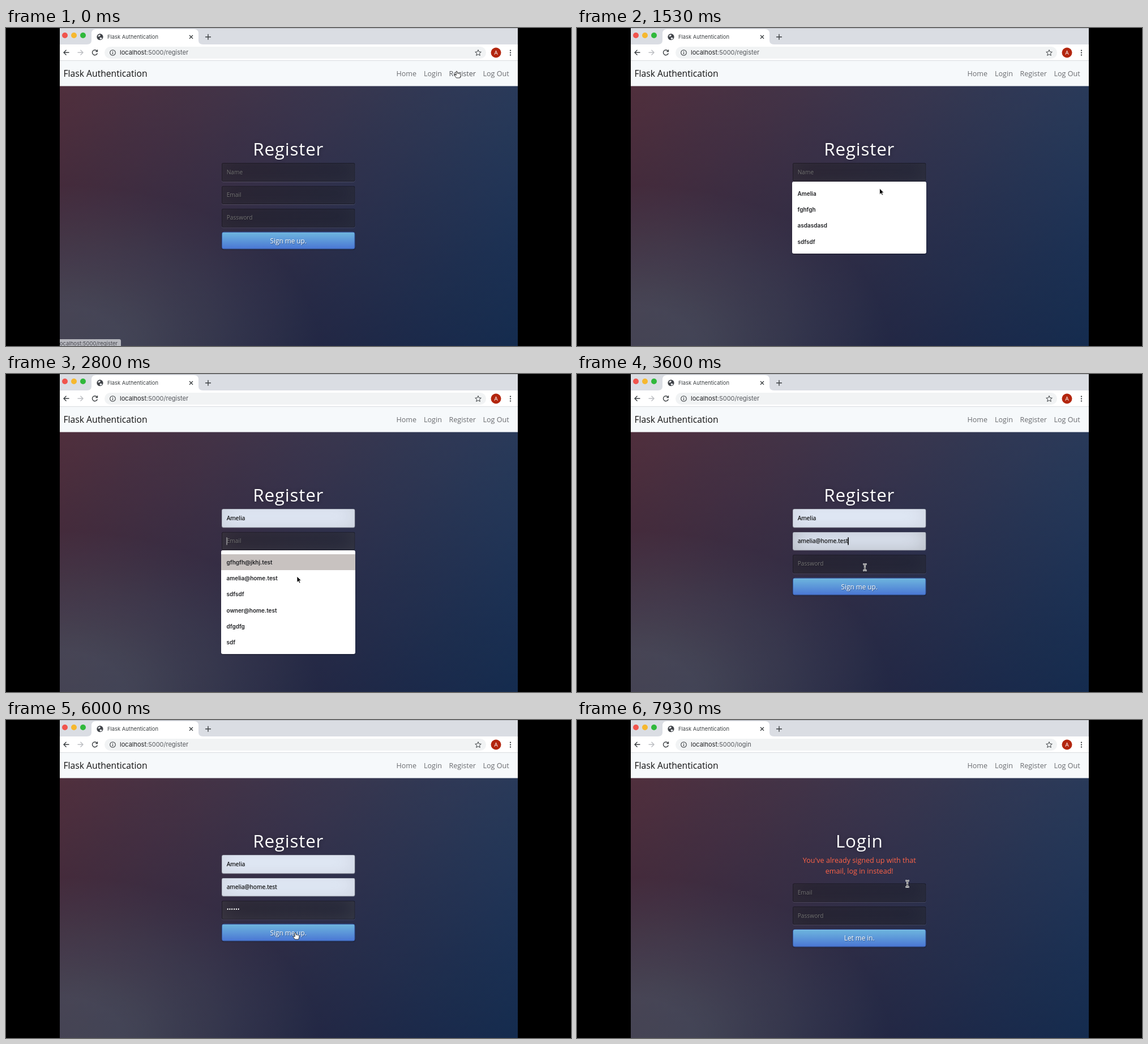
Recreate the animation shown at these times as an HTML page. Size 998x561 px, loop 8000 ms.

```html
<!DOCTYPE html>
<html lang="en">
<head>
<meta charset="utf-8">
<title>Flask Authentication</title>
<style>
html, body { margin: 0; width: 100%; height: 100%; overflow: hidden; background: #000; }
body { position: relative; font-family: "Open Sans", sans-serif; }
body > * { position: absolute; }
svg { left: 0; top: 0; }
.ui { font-family: Inter, sans-serif; }
#page {
  left: 95px; top: 58px; width: 809px; height: 503px;
  background:
    linear-gradient(rgba(0,0,0,.09), rgba(0,0,0,.09)),
    radial-gradient(ellipse farthest-corner at 0% 100%, rgba(104,128,138,.4) 10%, rgba(138,114,76,0) 40%),
    linear-gradient(rgba(57,173,219,.25), rgba(42,60,87,.4)),
    linear-gradient(135deg, #670d10, #092756);
}
#form { left: 381px; top: 194.1px; width: 300px; transform: scale(.785); transform-origin: 0 0; }
h1 {
  margin: 0 0 8px; font: 400 40px/48px "Open Sans", sans-serif; letter-spacing: 1px;
  color: #fff; text-align: center; text-shadow: 0 0 10px rgba(0,0,0,.3);
}
#error { margin: 0 0 16px; font-size: 16px; line-height: 24px; text-align: center; color: tomato; white-space: nowrap; }
.field {
  box-sizing: border-box; height: 41.5px; margin-bottom: 10px; padding: 10px;
  font-size: 13px; line-height: 19.5px; white-space: pre; color: #fff;
  background: rgba(0,0,0,.3); border: 1px solid rgba(0,0,0,.3); border-radius: 4px;
  text-shadow: 1px 1px 1px rgba(0,0,0,.3);
}
.field.filled { background: #e8f0fe; color: #000; }
.field i { display: inline-block; width: 1.3px; height: 17px; margin-right: -1.3px; vertical-align: -4px; background: currentColor; }
.field span { color: #757575; }
#button {
  box-sizing: border-box; height: 39.5px; font-size: 15px; line-height: 38px; text-align: center; color: #fff;
  background: linear-gradient(#6eb6de, #4a77d4); border: 1px solid #3762bc; border-radius: 5px;
  text-shadow: 1px 1px 1px rgba(0,0,0,.4);
  box-shadow: inset 0 1px 0 rgba(255,255,255,.2), 0 1px 2px rgba(0,0,0,.5);
}
#menu {
  left: 380px; width: 237px; padding: 6.5px 0; background: #fff; border-radius: 3px;
  box-shadow: 0 1px 2px rgba(0,0,0,.35); font: 600 10px/28.4px Inter, sans-serif; color: #202124;
}
#menu div { height: 28.4px; padding-left: 9.5px; }
#menu .on { background: #c8c2c0; }
</style>
</head>
<body>
<div id="page"></div>

<svg width="998" height="561">
  <g id="status" class="ui">
    <path d="M95 561V549H200q3 0 3 3V561Z" fill="#d5d6da" fill-opacity=".8"/>
    <text x="92.5" y="560" font-size="9.5" fill="#45464d">localhost:5000/register</text>
  </g>
  <path d="M0 0H95V561H0Z"/>
  <path d="M95 0H904V30H95Z" fill="#dadde3"/>
  <path d="M95 0H904V1H95Z" fill="#b5b8be"/>
  <path d="M95 29H904V58H95Z" fill="#fff"/>
  <path d="M143 29Q151 29 151 22V10Q151 2 159 2H332Q340 2 340 10V22Q340 29 348 29Z" fill="#fff"/>
  <circle cx="104" cy="13" r="5" fill="#f0544d"/>
  <circle cx="120" cy="13" r="5" fill="#f6b82f"/>
  <circle cx="136" cy="13" r="5" fill="#30b93c"/>
  <circle cx="166" cy="15.7" r="5.6" fill="#3f4247"/>
  <path d="M162 14l3-2.5 2 1-1 2-2.500 1zM166 16.500l3 .5 1 1.500-2.500 2-2-1.500z" fill="#e8eaed"/>
  <g class="ui">
    <text x="179" y="19" font-size="9.4" fill="#3c4043">Flask Authentication</text>
    <rect x="174" y="33" width="674" height="21" rx="10.5" fill="#f1f3f4"/>
    <text x="201" y="47" font-size="11" fill="#202124">localhost<tspan id="url" fill="#55585d"></tspan></text>
    <circle cx="865.5" cy="43.500" r="9" fill="#b3260f"/>
    <text x="865.5" y="47" font-size="9.500" fill="#fff" text-anchor="middle">A</text>
  </g>
  <g fill="none" stroke="#3c4043" stroke-width="1.4">
    <path d="M324 12.800l6 6m0-6l-6 6M352 15.700h10m-5-5v10"/>
    <path d="M111.500 43.300h-9.500m4.500-4.500l-4.500 4.500 4.500 4.500"/>
    <path d="M126.500 43.300h9.500m-4.500-4.500l4.500 4.500-4.500 4.500" stroke="#bcbec2"/>
    <path d="M160.500 40.500a4.500 4.500 0 1 0 .8 4M161.500 38.300v3.200h-3.200"/>
    <circle cx="188.500" cy="43.500" r="4.800" stroke-width="1.1"/>
    <path d="M188.500 42.800v3.400M188.500 40.600v1.200" stroke-width="1.2"/>
    <path d="M834 38.500l1.500 3.500 3.800.3-2.900 2.500.9 3.700-3.300-2-3.300 2 .9-3.700-2.900-2.500 3.800-.3z" stroke-width="1"/>
  </g>
  <path d="M891 39.600h0m0 4h0m0 4h0" stroke="#3c4043" stroke-width="2.400" stroke-linecap="round"/>
  <path d="M95 58H904V102.500H95Z" fill="#f6f9fb"/>
  <path d="M95 57.500H904" stroke="#d9dce0"/>
  <text x="101.500" y="86" font-size="15.700" fill="#111">Flask Authentication</text>
  <g font-size="12.560" fill="#6a6c70">
    <text x="689.500" y="85">Home</text>
    <text x="738" y="85">Login</text>
    <text id="link" x="782.500" y="85">Register</text>
    <text x="842.500" y="85">Log Out</text>
  </g>
</svg>

<div id="form">
  <h1 id="title"></h1>
  <p id="error">You've already signed up with that<br>email, log in instead!</p>
  <div class="field" id="name"></div>
  <div class="field" id="email"></div>
  <div class="field" id="password"></div>
  <div id="button"></div>
</div>

<div id="menu"></div>

<svg width="998" height="561">
  <g id="cursor" stroke-linejoin="round">
    <path id="arrow" d="M0 0V10.600L2.500 8.300 4.200 12 6 11.200 4.300 7.600H7.600Z" fill="#000" stroke="#fff" stroke-width=".8"/>
    <path id="hand" d="M-1 .8Q0-.7 1 .8L1.700 4.200Q3 3.400 3.700 4.400 5 3.800 5.500 4.900 7 4.600 7 6.200 7.200 9 5.600 12H-.6Q-3 9-4 6.800-3.600 5.400-2 6.600L-.8 7.400Z" fill="#fff" stroke="#222" stroke-width=".9"/>
    <g id="beam" fill="none">
      <path id="stem" d="M-3-5.500Q0-5.500 0-4 0-5.500 3-5.500M0-4V4M-3 5.500Q0 5.500 0 4 0 5.500 3 5.500M-1.500 1.500H1.500" stroke="#fff" stroke-width="2.400"/>
      <use href="#stem" style="stroke:#333"/>
      <path d="M-3-5.500Q0-5.500 0-4 0-5.500 3-5.500M0-4V4M-3 5.500Q0 5.500 0 4 0 5.500 3 5.500M-1.500 1.500H1.500" stroke="#333" stroke-width=".9"/>
    </g>
  </g>
</svg>

<script>
const $ = id => document.getElementById(id);
const LOOP = 8000, STEP = 1000 / 15;
const USER = "Amelia", MAIL = "amelia@home.test";
const NAMES = [USER, "fghfgh", "asdasdasd", "sdfsdf"];
const MAILS = ["gfhgfh@jkhj.test", MAIL, "sdfsdf", "owner@home.test", "dfgdfg", "sdf"];
const KEYS = [4330, 4530, 4660, 4860, 5060, 5330];   // password key presses
const CARET = [1930, 2460, 3260, 3800, ...KEYS];     // moments the caret restarts its blink
const LOGIN = 6460;

// time, x, y, pointer shape until the next entry
const PATH = [
  [0, 796, 76, "hand"], [70, 796, 76, "hand"], [400, 803, 79, "hand"], [800, 810, 77, "hand"],
  [1000, 810, 77, "arrow"], [1200, 690, 170, "arrow"], [1330, 560, 256, "beam"],
  [1530, 535, 283, "arrow"], [1800, 500, 291, "arrow"], [2000, 500, 291, "beam"],
  [2330, 500, 291, "beam"], [2530, 502, 298, "arrow"], [2800, 514, 357, "arrow"],
  [2930, 514, 360, "arrow"], [3200, 514, 360, "beam"], [3600, 508.5, 341, "beam"],
  [4000, 508, 338, "beam"], [4060, 508, 338, ""], [5460, 508, 338, "beam"],
  [5660, 509, 356, "hand"], [5860, 511, 375, "hand"], [6800, 511, 375, "hand"],
  [7060, 530, 418, "arrow"], [7330, 659, 340, "arrow"], [7530, 580, 227, "arrow"],
  [7660, 450, 258, "beam"], [7930, 583.5, 289, "beam"], [LOOP, 583.5, 289, "beam"]
];

const clamp = v => Math.max(0, Math.min(1, v));
const within = (t, a, b) => t >= a && t < b;
const show = (id, on) => $(id).style.display = on ? "" : "none";

function setField(id, t, hint, text, filled, from, to) {
  const el = $(id), glow = clamp((t - from) / 500) - clamp((t - to) / 500);
  const reset = CARET.filter(c => c <= t).pop();
  const caret = within(t, from, to) && reset !== undefined && (t - reset) % 1000 < 500;
  el.className = filled ? "field filled" : "field";
  el.style.boxShadow = `inset 0 -5px 45px rgba(100,100,100,${.2 + .2 * glow}), 0 1px 1px rgba(255,255,255,.2)`;
  el.innerHTML = text + (caret ? "<i></i>" : "") + (text ? "" : `<span>${hint}</span>`);
}

function setMenu(items, top, active) {
  $("menu").style.top = top + "px";
  $("menu").innerHTML = items.map((s, i) => `<div class="${i === active ? "on" : ""}">${s}</div>`).join("");
}

function setCursor(t) {
  const i = PATH.findIndex((p, n) => n === PATH.length - 1 || PATH[n + 1][0] > t);
  const a = PATH[i], b = PATH[i + 1] || a;
  const k = clamp((t - a[0]) / (b[0] - a[0] || 1));
  const x = a[1] + (b[1] - a[1]) * k, y = a[2] + (b[2] - a[2]) * k;
  $("cursor").setAttribute("transform", `translate(${x} ${y})`);
  for (const kind of ["arrow", "hand", "beam"]) show(kind, kind === a[3]);
}

function draw(t) {
  const login = t >= LOGIN;
  $("url").textContent = login ? ":5000/login" : ":5000/register";
  $("title").textContent = login ? "Login" : "Register";
  $("button").textContent = login ? "Let me in." : "Sign me up.";
  $("link").style.fill = t < 130 ? "#55575b" : "";
  $("status").style.opacity = 1 - clamp((t - 400) / 300);
  show("error", login);
  show("name", !login);

  const named = t >= 1660, mailed = t >= 2930 && !login;
  const dots = login ? 0 : KEYS.filter(k => k <= t).length;
  setField("name", t, "Name", named ? USER : "", named, 1400, 2400);
  setField("email", t, "Email", mailed ? MAIL : "", mailed, 2400, login ? 0 : 3800);
  setField("password", t, "Password", "•".repeat(dots), false, 3800, login ? 0 : LOGIN);
  if (login) for (const id of ["email", "password"])
    $(id).style.boxShadow = "inset 0 -5px 45px rgba(100,100,100,.2), 0 1px 1px rgba(255,255,255,.2)";

  const nameMenu = within(t, 1400, 1930), mailMenu = within(t, 2460, 3260);
  show("menu", nameMenu || mailMenu);
  if (nameMenu) setMenu(NAMES, 271, t < 1600 ? -1 : 0);
  if (mailMenu) setMenu(MAILS, 311, t < 2660 ? -1 : t < 2860 ? 0 : 1);
  setCursor(t);
}

let last = -1;
function tick() {
  const step = Math.floor((performance.now() % LOOP + 5) / STEP);
  if (step !== last) draw((last = step) * STEP);
  requestAnimationFrame(tick);
}
tick();
</script>
</body>
</html>
```
